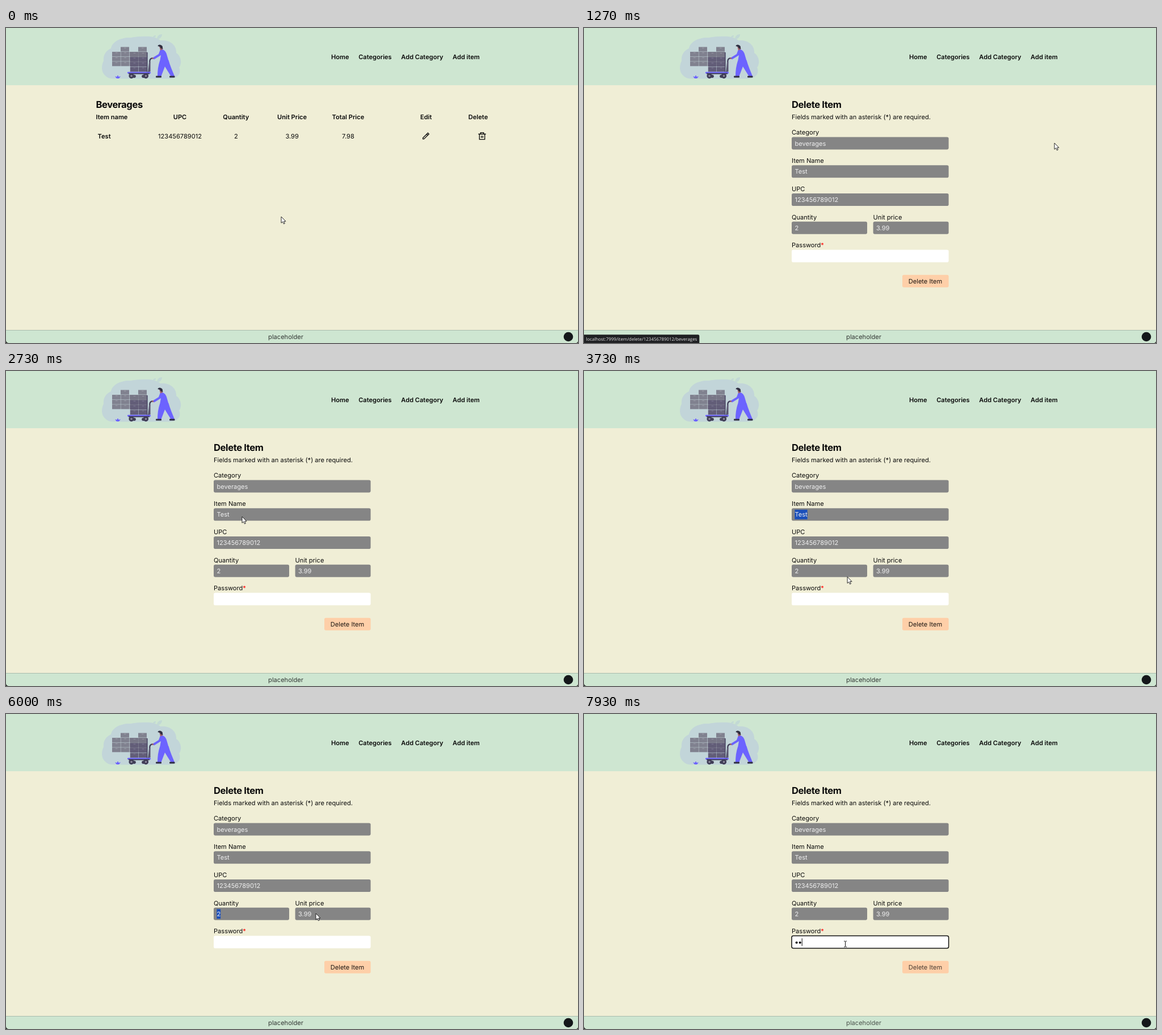
Recreate the animation shown at these times as an HTML page with a canvas. Size 1008 by 556 pixels, loop 8 s.

```html
<!DOCTYPE html>
<html lang="en">
<head>
<meta charset="utf-8">
<title>Inventory</title>
<style>
html, body { margin: 0; width: 100%; height: 100%; overflow: hidden; background: #f0eed6; }
canvas { display: block; }
</style>
</head>
<body>
<canvas id="stage" width="1008" height="556"></canvas>
<script>
const ctx = document.getElementById('stage').getContext('2d');
const LOOP = 8000, TICK = 1000 / 15;
const MINT = '#cee6d1', CREAM = '#f0eed6', INK = '#0a0a0a', BLUE = '#6c63ff', DARK = '#3f3d56';
const SIZE = 11.08, ROW = 49.8, COLUMN = 98.8;

// Pointer moves, times in ticks; bow bends the way sideways
const moves = [
  { from: 1, to: 14, x: 835, y: 191, bow: [260, 30] },
  { from: 15, to: 19, x: 829, y: 203 },
  { from: 20, to: 29, x: 451, y: 208 },
  { from: 34, to: 41, x: 416, y: 257 },
  { from: 48, to: 61, x: 432, y: 360, bow: [40, 40] },
  { from: 61, to: 67, x: 417, y: 306 },
  { from: 69, to: 70, x: 415.5, y: 320 },
  { from: 70, to: 81, x: 412, y: 347 },
  { from: 83, to: 90, x: 546, y: 352, bow: [0, 8] },
  { from: 90, to: 101, x: 552, y: 349 },
  { from: 102, to: 110, x: 460.5, y: 406 }
];

function text(str, x, y, { size = SIZE, weight = 400, color = INK, align = 'left', family = 'Inter', space = 0 } = {}) {
  ctx.font = `${weight} ${size}px ${family}, sans-serif`;
  ctx.textRendering = 'geometricPrecision';
  ctx.letterSpacing = `${space}px`;
  ctx.textAlign = align;
  ctx.fillStyle = color;
  ctx.fillText(str, x, y);
  return ctx.measureText(str).width;
}

const heading = str => text(str, str === 'Beverages' ? 158.4 : 366, 141, { size: 16.62, weight: 700, space: -0.4 });

function rect(x, y, w, h, color, r = 0) {
  ctx.fillStyle = color;
  ctx.beginPath();
  ctx.roundRect(x, y, w, h, r);
  ctx.fill();
}

function disc(x, y, r, color) {
  ctx.fillStyle = color;
  ctx.beginPath();
  ctx.arc(x, y, r, 0, 7);
  ctx.fill();
}

function shape(d, color) {
  ctx.fillStyle = color;
  ctx.fill(new Path2D(d));
}

function line(d, color, width) {
  ctx.strokeStyle = color;
  ctx.lineWidth = width;
  ctx.stroke(new Path2D(d));
}

// Line icon on a 24-unit grid
function icon(x, y, d) {
  ctx.save();
  ctx.translate(x, y);
  ctx.scale(2 / 3, 2 / 3);
  line(d, INK, 2);
  ctx.restore();
}

function crates(x, y, cols, rows, w, h, color, seam) {
  for (let r = 0; r < rows; r++) {
    for (let c = 0; c < cols; c++) {
      const bx = x + c * w, by = y + r * h;
      rect(bx, by, w - 0.5, h - 0.5, color);
      rect(bx + w * 0.38, by + 1.4, w * 0.24, 0.8, seam);
    }
  }
}

function picture() {
  shape('M176 85C167 78 168 66 172 58C171 48 176 40 185 36C187 24 203 16 220 17C240 14 262 13 272 22C288 20 301 30 300 44C308 49 311 62 305 70C309 78 305 88 290 89.5H190C184 89.5 179 88 176 85Z', '#c2d5d9');
  shape('M266 20C266 14 270 11 275 11C275 16 272 19 266 20ZM259 17C259 14 261 13 264 13C264 16 262 17 259 17Z', '#c2d9d5');
  for (const x of [202, 233]) crates(x, 33.5, 1, 1, 15.5, 8.5, '#80818f', '#a4a5b0');
  crates(187, 42, 4, 3, 15.4, 8.6, '#80818f', '#a4a5b0');
  crates(218.8, 42.5, 2, 1, 15.2, 8.8, '#777686', '#9c9caa');
  crates(218.8, 51.3, 2, 3, 15.2, 8.8, '#625d78', '#8983a0');
  rect(248, 43, 1.6, 35, '#4b4663');
  line('M251.5 78L253.5 57Q254 54 258 53', DARK, 2.2);
  line('M253.4 60V77', '#625d78', 2.4);
  rect(214, 77.4, 41, 3, BLUE, 1);
  rect(216, 79.6, 37, 1.8, DARK);
  for (const x of [221, 246.5]) {
    disc(x, 84.6, 4.6, DARK);
    disc(x, 84.6, 1.8, '#8b8799');
  }
  for (const x of [226, 242]) disc(x, 85.2, 2.8, DARK);
  shape('M271 58L286.5 57C289 66 293 75 297 85H290.5L280 68L273.5 85H267Q267 70 271 58Z', BLUE);
  shape('M272 38C277 37 281 40 283 46L286.5 58L271 59L273 48L261 55.5L258.5 52.5L269 46Z', BLUE);
  disc(258.7, 53.5, 1.6, '#9f616a');
  shape('M270 32H275.5L276 38L272 39.5Z', '#9f616a');
  shape('M267.5 32C267.5 28.5 273.5 28.5 275.5 32L276.5 37L273 36L271 33Z', '#2f2e41');
  rect(264, 84.5, 10, 3, '#2f2e41', 1);
  rect(288, 84.5, 9.5, 3, '#2f2e41', 1);
  shape('M192 85.5L196 86V84H198V86L202 85.5L199 89H195Z', BLUE);
}

function chrome(late) {
  rect(0, 0, 1008, 556, CREAM);
  rect(0, 0, 1008, 101, MINT);
  picture();
  let x = 573;
  for (const s of ['Home', 'Categories', 'Add Category', 'Add item']) {
    x += text(s, x, 54.6, { weight: 600 }) + SIZE * 1.5;
  }
  rect(0, 533, 1008, 23, MINT);
  rect(0, 533, 1008, 1, '#a9bcad');
  text('placeholder', 493, 549.2, { align: 'center', color: late ? '#4a524c' : '#333835' });
  disc(991, 545, 8.3, '#14171a');
  shape('M0 551.5Q0.5 555.5 4.5 556H0ZM1008 553Q1007.5 555.5 1005 556H1008Z', '#222');
}

function table(hover) {
  heading('Beverages');
  text('Item name', 158.4, 160.5, { weight: 600 });
  text('Test', 161.6, 194.5, { weight: 600 });
  const columns = { 'UPC': '123456789012', 'Quantity': '2', 'Unit Price': '3.99', 'Total Price': '7.98' };
  Object.entries(columns).forEach(([name, value], i) => {
    const x = 306.5 + i * COLUMN;
    text(name, x, 160.5, { weight: 600, align: 'center' });
    text(value, x, 194.5, { align: 'center' });
  });
  text('Edit', 740.2, 160.5, { weight: 600, align: 'center' });
  text('Delete', 832, 160.5, { weight: 600, align: 'center' });
  if (hover) rect(831, 182, 16, 17.5, '#fdcba2', 2);
  icon(732, 182.6, 'M4 20V17.2L17.2 4L20 6.8L6.8 20ZM14 7.2L16.8 10');
  icon(831, 182.6, 'M2 7H22M5 7V21H19V7M8 7V3H16V7M10 11V17M14 11V17');
}

function field(k, label, value, x, row, w, from, to) {
  const y = 188.2 + row * ROW;
  const labelWidth = text(label, x, y);
  rect(x, y + 4.2, w, 22, value ? '#858585' : '#fff', 2.8);
  if (k >= from && k < to) rect(x + 5.4, y + 6.8, ctx.measureText(value).width, 17, '#1a4fba');
  text(value, x + 5.4, y + 19.3, { color: '#efefef' });
  return x + labelWidth;
}

function form(k, late) {
  const full = 276.6, half = 133;
  heading('Delete Item');
  text('Fields marked with an asterisk (*) are required.', 366, 160.5);
  field(k, 'Category', 'beverages', 366, 0, full, 32, 41);
  field(k, 'Item Name', 'Test', 366, 1, full, 43, 64);
  field(k, 'UPC', '123456789012', 366, 2, full, 67, 82);
  field(k, 'Quantity', '2', 366, 3, half, 84, 94);
  field(k, 'Unit price', '3.99', 366 + full - half, 3, half);
  const end = field(k, 'Password', '', 366, 4, full);
  text('*', end, 188.2 + 4 * ROW, { color: '#f00' });
  rect(561, 435.8, 81.6, 22, '#fecfa8', 2.8);
  text('Delete Item', 601.5, 451, { align: 'center', color: late ? '#4a3d33' : '#1c1712' });
  if (k >= 111) password(k);
}

function password(k) {
  ctx.strokeStyle = '#101010';
  ctx.lineWidth = 1.5;
  ctx.beginPath();
  ctx.roundRect(366, 391.5, 276.6, 22, 3);
  ctx.stroke();
  const count = (k >= 116) + (k >= 119);
  for (let i = 0; i < count; i++) disc(374.6 + i * 6.1, 403.6, 2, INK);
  rect(371.5 + count * 6.1, 396, 1, 13.5, INK);
}

function status() {
  rect(0, 541.3, 203.3, 15, '#1f2023', [0, 2.5, 0, 0]);
  text('localhost:7999/item/delete/123456789012/beverages', 3.5, 551.9,
    { size: 7.9, color: '#e6e6e6', family: '"Open Sans"' });
}

function place(k) {
  let x = 485, y = 333;
  for (const m of moves) {
    if (k <= m.from) break;
    const u = Math.min(1, (k - m.from) / (m.to - m.from));
    const s = u * u * (3 - 2 * u), arc = Math.sin(Math.PI * u);
    const [bx, by] = m.bow || [0, 0];
    x += (m.x - x) * s + bx * arc;
    y += (m.y - y) * s + by * arc;
  }
  return [x, y];
}

function pointer(k) {
  const arrow = 'M0 0V11.2L2.6 8.8L4.4 12.8L6.3 12L4.6 8.2H8Z';
  const hand = 'M2.4 9.5V2Q3.4 0.6 4.4 2V6.2Q5.6 5.5 6.4 6.6Q7.6 6 8.4 7.2Q10.6 6.8 10.7 8.7V11.5Q10.5 13.5 9.4 14.5V16.7H3.8V15L0.3 11Q-0.8 8.8 0.8 8.7Z';
  const beam = 'M-2.5 -5H-0.7L0 -4.4L0.7 -5H2.5M0 -4.4V4.4M-2.5 5H-0.7L0 4.4L0.7 5H2.5';
  ctx.save();
  ctx.translate(...place(k));
  ctx.lineJoin = 'round';
  if (k >= 109) {
    line(beam, '#111', 1);
  } else {
    const d = k >= 14 && k < 18 ? hand : arrow;
    shape(d, '#fff');
    line(d, '#111', 0.9);
  }
  ctx.restore();
}

function draw(t) {
  const k = Math.floor((t + 4) / TICK);
  const late = k >= 111;
  chrome(late);
  if (k < 17) table(k >= 14);
  else form(k, late);
  if (k >= 16 && k < 24) status();
  pointer(k);
}

const start = performance.now();
function loop(now) {
  draw(Math.max(0, now - start) % LOOP);
  requestAnimationFrame(loop);
}
draw(0);
requestAnimationFrame(loop);
</script>
</body>
</html>
```
